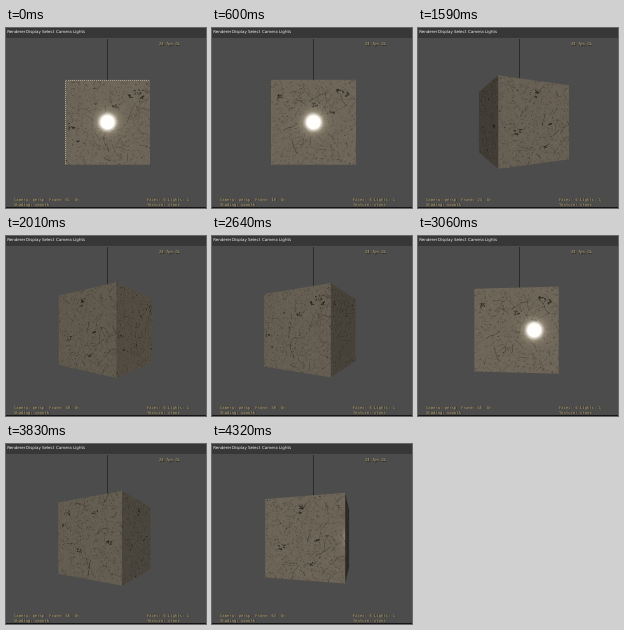
Write an HTML page with a canvas that moves like this. It is 200x180 px and loops after 4390 ms.

```html
<!DOCTYPE html>
<html lang="en">
<head>
<meta charset="utf-8">
<title>Rotating stone cube</title>
<style>
html, body { margin: 0; width: 100%; height: 100%; overflow: hidden; background: #4c4c4c; }
canvas { display: block; width: 200px; height: 180px; }
</style>
</head>
<body>
<canvas id="view" width="200" height="180"></canvas>
<script>
const ctx = document.getElementById('view').getContext('2d');
const LOOP = 4390;
const CX = 101.5, CY = 94.2;     // cube centre on screen
const DIST = 4.62, FOCAL = 153.9; // camera, in half cube sides
const TEX = 170;

// time in ms, step count so far, turn in degrees
const KEYS = [
  [0, 0, 0], [600, 9, 90], [1170, 17, 180], [2010, 29, 307.5],
  [2640, 38, 390], [3410, 49, 510], [4320, 62, 645.5], [4390, 63, 656]
];

// dark stains on each side: u, v, size
const STAINS = [
  [[.85, .15, 5], [.78, .2, 3], [.92, .21, 3], [.6, .31, 4], [.07, .56, 4], [.15, .72, 2]],
  [[.86, .17, 5], [.8, .13, 3], [.53, .3, 4], [.1, .2, 3], [.72, .38, 3]],
  [[.17, .17, 5], [.1, .32, 4], [.64, .2, 4], [.84, .55, 3], [.4, .66, 4]],
  [[.5, .13, 5], [.46, .2, 3], [.24, .61, 5], [.68, .52, 3], [.6, .8, 3]]
];

function random(seed) {
  return () => {
    seed = (seed * 1664525 + 1013904223) >>> 0;
    return seed / 4294967296;
  };
}

function makeStone(index) {
  const c = document.createElement('canvas');
  c.width = c.height = TEX;
  const g = c.getContext('2d');
  const rnd = random(71 + index * 913);
  const spread = n => (rnd() - .5) * n;
  g.fillStyle = '#6e6659';
  g.fillRect(0, 0, TEX, TEX);

  for (let i = 0; i < 1500; i++) {
    g.fillStyle = rnd() < .55 ? 'rgba(45,39,30,.15)' : 'rgba(150,141,124,.13)';
    g.fillRect(rnd() * TEX, rnd() * TEX, 1 + rnd() * 3, 1 + rnd() * 3);
  }

  function crack(x, y, dir, length) {
    g.beginPath();
    g.moveTo(x, y);
    for (let i = 0; i < length; i++) {
      dir += spread(.9);
      x += Math.cos(dir) * 3;
      y += Math.sin(dir) * 3;
      g.lineTo(x, y);
    }
    g.stroke();
  }
  for (let i = 0; i < 70; i++) {
    g.lineWidth = .5 + rnd() * .7;
    g.strokeStyle = i % 6 ? `rgba(38,34,28,${.2 + rnd() * .4})` : 'rgba(155,146,130,.2)';
    crack(rnd() * TEX, rnd() * TEX, -.75 + spread(3.2), 3 + rnd() * 9);
  }

  g.fillStyle = 'rgba(32,29,25,.65)';
  for (const [u, v, size] of STAINS[index]) {
    for (let i = 0; i < 9; i++) {
      g.beginPath();
      g.ellipse(u * TEX + spread(size * 3.4), v * TEX + spread(size * 2),
        .6 + rnd() * size * .55, .5 + rnd() * 1.3, .4 + spread(1), 0, 7);
      g.fill();
    }
  }
  for (let i = 0; i < 60; i++) {
    g.fillRect(rnd() * TEX, rnd() * TEX, 1 + rnd() * 1.8, 1 + rnd());
  }
  return c;
}

const stones = STAINS.map((_, i) => makeStone(i));

function poseAt(t) {
  let i = 0;
  while (t >= KEYS[i + 1][0]) i++;
  const [t0, n0, a0] = KEYS[i], [t1, n1, a1] = KEYS[i + 1];
  const part = Math.floor((t - t0) / (t1 - t0) * (n1 - n0) + 1e-6);
  return { step: n0 + part, angle: a0 + (a1 - a0) * part / (n1 - n0) };
}

function drawSide(stone, phi) {
  const c = Math.cos(phi), s = Math.sin(phi);
  if (DIST * c <= 1) return;
  const project = u => {
    const k = FOCAL / (DIST - u * s - c);
    return { x: CX + (u * c - s) * k, h: k };
  };
  const l = project(-1), r = project(1);
  ctx.save();
  ctx.beginPath();
  ctx.moveTo(l.x, CY - l.h);
  ctx.lineTo(r.x, CY - r.h);
  ctx.lineTo(r.x, CY + r.h);
  ctx.lineTo(l.x, CY + l.h);
  ctx.closePath();
  ctx.clip();

  for (let x = Math.floor(l.x); x < r.x; x++) {
    const X = x + .5 - CX;
    let u = (X * (DIST - c) + FOCAL * s) / (FOCAL * c + X * s);
    u = Math.max(-1, Math.min(1, u));
    const h = project(u).h;
    const w = Math.min(12, Math.max(1, TEX / (r.x - l.x)));
    const sx = Math.max(0, Math.min(TEX - w, (u + 1) / 2 * TEX - w / 2));
    ctx.drawImage(stone, sx, 0, w, TEX, x, CY - h - .5, 1, 2 * h + 1);
  }

  // sides turned away get darker
  const away = 1 - c;
  ctx.fillStyle = `rgba(18,17,15,${away * (.58 + .5 * away)})`;
  ctx.fillRect(0, 0, 200, 180);

  // reflection of the lamp beside the camera
  const foot = DIST * s;
  if (Math.abs(foot) < 1.6) {
    const x = project(foot).x;
    const glow = ctx.createRadialGradient(x, CY, 0, x, CY, 26);
    glow.addColorStop(0, '#fff');
    glow.addColorStop(.25, '#fffefa');
    glow.addColorStop(.31, 'rgba(250,246,235,.72)');
    glow.addColorStop(.42, 'rgba(215,204,180,.3)');
    glow.addColorStop(.62, 'rgba(170,158,135,.1)');
    glow.addColorStop(1, 'rgba(150,140,120,0)');
    ctx.fillStyle = glow;
    ctx.fillRect(x - 26, CY - 26, 52, 52);
  }
  ctx.restore();
}

function label(text, x, y, color) {
  ctx.fillStyle = color;
  ctx.fillText(text, x, y);
}

function readout(text, x, y) {
  label(text, x + .6, y + .5, '#1e1c16');
  label(text, x, y, '#b8a874');
}

function drawPanel(step) {
  ctx.fillStyle = '#4c4c4c';
  ctx.fillRect(0, 0, 200, 180);
  ctx.fillStyle = '#373737';
  ctx.fillRect(0, 0, 200, 10);
  ctx.fillStyle = '#151515';
  ctx.fillRect(0, 179, 200, 1);

  ctx.font = '4px "DejaVu Sans", sans-serif';
  const menu = [['Renderer', 1.2], ['Display', 20], ['Select', 36], ['Camera', 50], ['Lights', 67]];
  for (const [word, x] of menu) label(word, x, 5.4, '#f0f0f0');

  ctx.font = '3.9px "DejaVu Sans Mono", monospace';
  readout('24 fps GL', 153, 17);
  readout('Camera: persp  Frame: ' + String(step + 1).padStart(2, '0') + '  On', 8, 172.5);
  readout('Shading: smooth', 8, 177.8);
  readout('Faces: 6 Lights: 1', 141, 172.5);
  readout('Texture: stone', 141, 177.8);

  ctx.fillStyle = '#2a2a2a';
  ctx.fillRect(101, 11, 1, 45);
}

function draw(t) {
  const { step, angle } = poseAt(t);
  drawPanel(step);
  const k = Math.floor(angle / 90);
  for (const n of [k - 1, k + 1, k]) {
    drawSide(stones[(n + 4) % 4], (angle - n * 90) * Math.PI / 180);
  }
  if (step === 0) {
    ctx.strokeStyle = 'rgba(205,198,180,.6)';
    ctx.setLineDash([1, 1]);
    ctx.beginPath();
    ctx.moveTo(59.5, 136);
    ctx.lineTo(59.5, 52.5);
    ctx.lineTo(144, 52.5);
    ctx.stroke();
    ctx.setLineDash([]);
  }
}

const start = performance.now();
function tick() {
  draw((performance.now() - start) % LOOP);
  requestAnimationFrame(tick);
}
tick();
</script>
</body>
</html>
```
